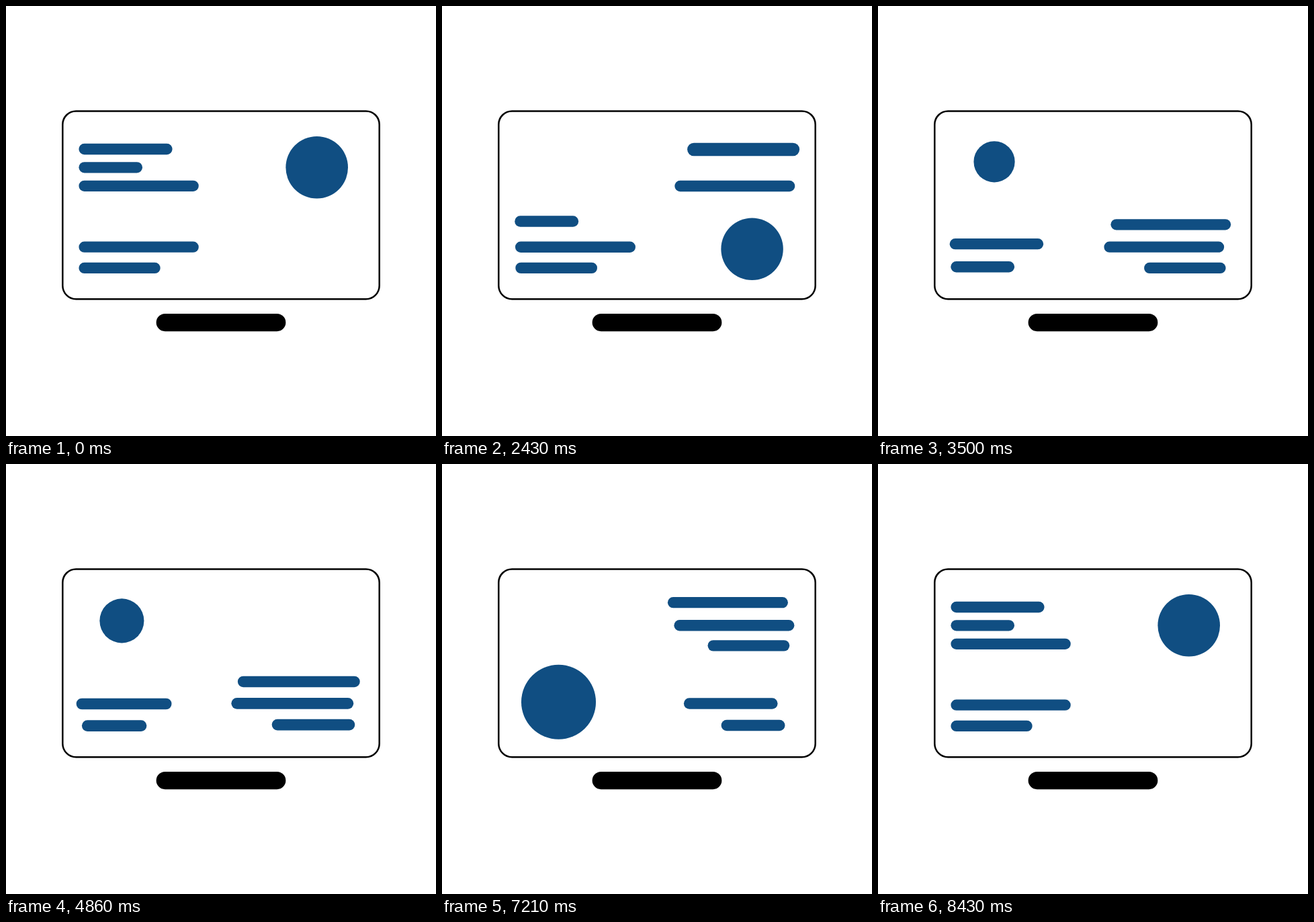
Animation of 640 by 640 pixels, one loop 9570 ms. Source, as an HTML page:

```html
<!DOCTYPE html>
<html lang="en">
<head>
<meta charset="utf-8">
<title>Shifting layout</title>
<style>
  html, body { margin: 0; width: 100%; height: 100%; overflow: hidden; background: #fff; }
  svg { display: block; width: 100%; height: 100%; }
</style>
</head>
<body>
<svg viewBox="0 0 640 640">
  <rect x="84.3" y="156.4" width="471.4" height="279.8" rx="20" fill="#fff" stroke="#000" stroke-width="2.5"/>
  <rect x="223.6" y="458" width="192.8" height="26.2" rx="13.1"/>
  <g id="shapes" fill="#104e82"></g>
</svg>
<script>
const LOOP = 9570, STEP = 2400, MOVE = 1200, HALF = MOVE / 2;
const FPS = 14, BASE_FPS = 30;
const LEFT = 108.4, BAR = 16.3, DISC = 92.6;
const SWELL = 1.2, EASE_OUT = 0.275;

const group = document.getElementById("shapes");

// Each move names only what changes; the last move returns to the start
function shape(w, h, start, ...moves) {
  const spots = [{ size: 1, ...start }];
  for (const m of moves) spots.push({ ...spots.at(-1), ...m });
  const el = document.createElementNS("http://www.w3.org/2000/svg", "rect");
  group.appendChild(el);
  return { w, h, spots, el, isBar: w !== h };
}

const bar = (w, y, ...moves) => shape(w, BAR, { x: LEFT + w / 2, y }, ...moves);

const shapes = [
  bar(139.2, 213, { x: 449.5, size: SWELL }, { x: 171, y: 357, size: 1 }, { x: 430.7 }),
  bar(94.6, 240.3, { y: 320.3 }, { y: 389.6 }, { x: 464.2 }),
  bar(178.4, 267.8, { x: 435.8 }, { y: 325.5 }, { y: 240.1 }),
  bar(178.4, 358.7, {}, { x: 426.3 }, { y: 205.6 }),
  bar(121.3, 389.9, {}, { x: 457.5 }, { y: 269.9 }),
  shape(DISC, DISC, { x: 462.7, y: 240.3 },
    { y: 362.3 }, { x: 172.4, y: 231.5, size: 0.66 }, { y: 354.7, size: SWELL })
];

const clamp = v => Math.min(1, Math.max(0, v));
const mix = (a, b, p) => a + (b - a) * p;

// Bezier ease from (EASE_OUT, 0) to (tail, 1)
function ease(x, tail = 0) {
  x = clamp(x);
  if (x === 0 || x === 1) return x;
  let lo = 0, hi = 1;
  for (let i = 0; i < 30; i++) {
    const t = (lo + hi) / 2, u = 1 - t;
    if (3 * EASE_OUT * t * u * u + 3 * tail * t * t * u + t * t * t < x) lo = t;
    else hi = t;
  }
  return lo * lo * (3 - 2 * lo);
}

// The lower shapes arrive sharply except on the third move; the top two bars start out gentle
function tailOf(index, move) {
  if (index > 2) return move === 2 ? 0.23 : -0.03;
  if (move > 1) return 0;
  return index < 2 ? 0.67 : 0.07;
}

// Bars swell halfway through a move; the first move swells only those going sideways
function sizeAt(s, a, b, move, ms, p) {
  const swells = b.size === SWELL || s.isBar && (move > 0 || a.x !== b.x);
  if (!swells) return mix(a.size, b.size, p);
  return ms < HALF
    ? mix(a.size, SWELL, ease(ms / HALF))
    : mix(SWELL, b.size, ease((ms - HALF) / HALF));
}

// Time advances in held ticks, each snapped to the base frame rate
function tick(ms) {
  const n = Math.floor((ms + 5) * FPS / 1000);
  return Math.ceil(n * BASE_FPS / FPS - 1e-6) * 1000 / BASE_FPS;
}

function draw(now) {
  const time = tick(now % LOOP);
  const move = Math.min(3, Math.floor(time / STEP + 1e-6));
  const ms = time - move * STEP;
  shapes.forEach((s, i) => {
    const a = s.spots[move], b = s.spots[(move + 1) % 4];
    const p = ease(ms / MOVE, tailOf(i, move));
    const k = sizeAt(s, a, b, move, ms, p);
    const w = s.w * k, h = s.h * k;
    const box = {
      x: mix(a.x, b.x, p) - w / 2, y: mix(a.y, b.y, p) - h / 2,
      width: w, height: h, rx: h / 2
    };
    for (const key in box) s.el.setAttribute(key, box[key].toFixed(3));
  });
}

let start;
function frame(now) {
  if (start === undefined) start = now;
  draw(Math.max(0, now - start));
  requestAnimationFrame(frame);
}
draw(0);
requestAnimationFrame(frame);
</script>
</body>
</html>
```
